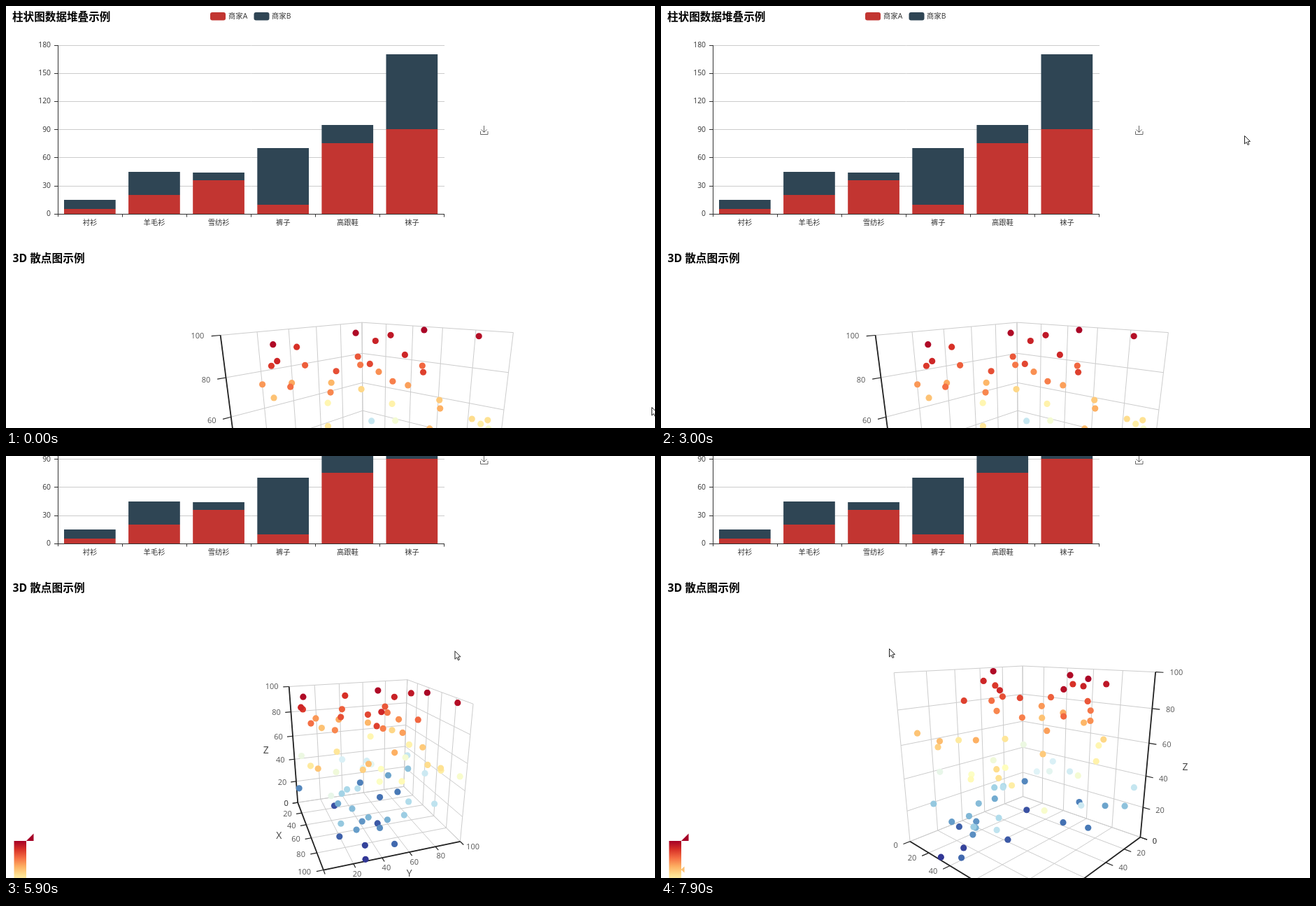
Recreate the animation shown at these times as an HTML page with a canvas. Size 928 px wide and 603 px high, loop 8000 ms.

```html
<!DOCTYPE html>
<html lang="zh">
<head>
<meta charset="utf-8">
<title>图表示例</title>
<style>
html, body { margin: 0; width: 100%; height: 100%; overflow: hidden; background: #fff; }
canvas { display: block; }
</style>
</head>
<body>
<canvas id="stage" width="928" height="603"></canvas>
<script>
const ctx = document.getElementById('stage').getContext('2d');
const FONT = '"Open Sans", "Noto Sans CJK SC", "Noto Sans CJK", sans-serif';
const LOOP = 8000, RED = '#c23531', BLUE = '#2f4554';
const mix = (a, b, k) => a + (b - a) * k;
const clamp = (v, lo, hi) => Math.min(hi, Math.max(lo, v));
const span = (t, start, end) => clamp((t - start) / (end - start), 0, 1);
const easeOut = k => 1 - (1 - k) ** 3;

function path(points) {
  ctx.beginPath();
  points.forEach(p => ctx.lineTo(p[0], p[1]));
}
function line(points, color, width = 1) {
  path(points);
  ctx.strokeStyle = color;
  ctx.lineWidth = width;
  ctx.stroke();
}
function shape(points, color) {
  path(points);
  ctx.fillStyle = color;
  ctx.fill();
}
function box(x, y, w, h, color, r = 0) {
  ctx.beginPath();
  ctx.roundRect(x, y, w, h, r);
  ctx.fillStyle = color;
  ctx.fill();
}
function dot(x, y, r, color) {
  ctx.beginPath();
  ctx.arc(x, y, r, 0, 7);
  ctx.fillStyle = color;
  ctx.fill();
}
function text(s, x, y, size, color, align = 'left', weight = 400, baseline = 'middle') {
  ctx.font = `${weight} ${size}px ${FONT}`;
  ctx.textAlign = align;
  ctx.textBaseline = baseline;
  ctx.fillStyle = color;
  ctx.fillText(s, x, y);
}

// ---- Stacked bars ----
const goods = [['衬衫', 5, 10], ['羊毛衫', 20, 25], ['雪纺衫', 36, 8],
  ['裤子', 10, 60], ['高跟鞋', 75, 20], ['袜子', 90, 80]];
const HIDE = 1430, SHOW = 2250, STEP = 92.1;
const barY = (v, max) => 297.4 - 241.2 * v / max;

function drawBars(t) {
  const hidden = t >= HIDE && t < SHOW;
  const max = hidden ? 80 : 180, oldMax = hidden ? 180 : 80;
  const start = hidden ? HIDE : SHOW;
  const k = t < HIDE ? 1 : easeOut(span(t, start, start + 300));
  const solo = hidden ? k : 1 - k;
  const grow = t < SHOW ? 1 : easeOut(span(t, SHOW, SHOW + 700));

  text('柱状图数据堆叠示例', 9, 17, 15.6, '#000', 'left', 700);
  box(292, 9, 22, 11.5, hidden ? '#ccc' : RED, 3);
  text('商家A', 318, 15, 10.35, hidden ? '#ccc' : '#333');
  box(354.5, 9, 22, 11.5, BLUE, 3);
  text('商家B', 380, 15, 10.35, '#333');

  for (let v = 0; v <= max; v += hidden ? 20 : 30) {
    let y = barY(v, max);
    if (v === 60) y = mix(barY(v, oldMax), y, k);
    const row = Math.floor(y) + .5;
    if (v) line([[74, row], [627, row]], '#ccc');
    line([[69, row], [74, row]], '#333');
    text(v, 64, y, 10.35, '#333', 'right');
  }
  goods.forEach(([name, a, b], i) => {
    const x = 83 + i * STEP, width = 73.7;
    const bottom = Math.floor(mix(barY(a, 180), barY(0, 80), solo));
    const top = Math.floor(mix(barY(a + b, 180), barY(b, 80), solo));
    const aTop = Math.floor(barY(a * grow, 180));
    box(x, top, width, bottom - top, BLUE);
    box(x, aTop, hidden ? width * (1 - k) : width, 297 - aTop, t >= 1000 && t < SHOW ? '#d53a35' : RED);
    text(name, 120 + i * STEP, 310, 10.35, '#333', 'center');
  });
  line([[74.5, 56], [74.5, 301]], '#333');
  line([[74, 297.5], [627, 297.5]], '#333');
  for (let i = 1; i < 7; i++) {
    const x = Math.floor(74 + i * STEP) + .5;
    line([[x, 297], [x, 301.5]], '#333');
  }
  line([[678.5, 179], [678.5, 183.5], [689, 183.5], [689, 179]], '#666');
  line([[683.5, 171], [683.5, 180.5]], '#666');
  line([[679.5, 176.5], [683.5, 180.5], [687.5, 176.5]], '#666');
}

// ---- 3D scatter ----
const palette = ['#313695', '#4575b4', '#74add1', '#abd9e9', '#e0f3f8', '#ffffbf',
  '#fee090', '#fdae61', '#f46d43', '#d73027', '#a50026'];
function valueColor(v) {
  const i = clamp(Math.floor(v / 10), 0, 9), k = v / 10 - i;
  const part = (c, j) => parseInt(c.slice(j, j + 2), 16);
  return `rgb(${[1, 3, 5].map(j => Math.round(mix(part(palette[i], j), part(palette[i + 1], j), k)))})`;
}

let seed = 11;
const random = () => (seed = seed * 16807 % 2147483647) / 2147483647;
// The extremes and the inspected sample are fixed, the rest is scattered evenly by height
const samples = [[53, 92, 99], [28, 63, 98], [33, 5, 98], [82, 100, 97], [32, 89, 95],
  [32, 75, 93], [70, 50, 92], [39, 2, 92], [5, 23, 66], [85, 33, 2], [98, 29, 0]];
const SCATTERED = 68;
for (let i = 0; i < SCATTERED; i++) {
  samples.push([100 * random(), 100 * random(), mix(90, 3, i / SCATTERED)]);
}
const points = samples.map(s => ({ at: s.map(v => v - 50), color: valueColor(s[2]) }));

const CX = 522.5, CY = 608, FOCAL = 555, RAD = Math.PI / 180;
let view;
function setView(t) {
  const turn = span(t, 5500, 6400), back = span(t, 6600, 7100);
  const beta = (40 + 69 * turn + 23.8 * back) * RAD, alpha = (20 + 2 * turn - 5.5 * back) * RAD;
  const distance = 204 + 63 * easeOut(span(t, 3300, 4000)) + 22.5 * span(t, 4600, 4800)
    - 65.5 * span(t, 7200, 7900);
  view = { distance, side: beta < Math.PI / 2 ? -50 : 50, cb: Math.cos(beta), sb: Math.sin(beta),
    ca: Math.cos(alpha), sa: Math.sin(alpha) };
}
function project([x, y, z]) {
  const { distance, cb, sb, ca, sa } = view;
  const near = x * sb - y * cb, depth = distance - near * ca - z * sa;
  const scale = FOCAL / depth;
  return [CX + (x * cb + y * sb) * scale, CY - (z * ca - near * sa) * scale, depth];
}

const edge = (a, b, color, width) => line([project(a), project(b)], color, width);
const along = (p, dir, n) => p.map((v, i) => v + dir[i] * n);
function label(s, at, dir, size, color) {
  const a = project(at), b = project(along(at, dir, 8));
  const dx = b[0] - a[0], dy = b[1] - a[1];
  if (Math.abs(dy) > Math.abs(dx)) text(s, b[0], b[1], size, color, 'center', 400, 'top');
  else text(s, b[0], b[1], size, color, dx < 0 ? 'right' : 'left');
}
function axis(name, place, dir) {
  edge(place(-50), place(50), '#222', 1.8);
  for (let v = 0; v <= 100; v += 20) {
    const p = place(v - 50);
    edge(p, along(p, dir, 4.5), '#222', 1.2);
    label(v, p, dir, 11, '#555');
  }
  const [x, y] = project(along(place(0), dir, 22));
  text(name, x, y, 14, '#444', 'center');
}

// Lines over the back walls and floor that meet at x, y or z
function wallLines(x, y, z, wall, color) {
  edge([-50, -50, z], [-50, 50, z], color);
  edge([-50, wall, z], [50, wall, z], color);
  edge([x, wall, -50], [x, wall, 50], color);
  edge([x, -50, -50], [x, 50, -50], color);
  edge([-50, y, -50], [-50, y, 50], color);
  edge([-50, y, -50], [50, y, -50], color);
}

function drawScatter(t) {
  setView(t);
  const { side } = view, out = [0, Math.sign(side), 0], right = [1, 0, 0];
  const onX = v => [v, side, -50], onY = v => [50, v, -50], onZ = v => [-50, side, v];
  text('3D 散点图示例', 9.5, 361.5, 15.7, '#000', 'left', 700);

  for (let v = -50; v <= 50; v += 20) wallLines(v, v, v, -side, '#ccc');
  axis('X', onX, out);
  axis('Y', onY, right);
  axis('Z', onZ, out);

  if (t >= 6600 && t < 6900) {
    const x = 61.03, y = 0, z = 96.79;
    wallLines(x - 50, y - 50, z - 50, -side, '#333');
    label(x.toFixed(2), onX(x - 50), out, 13.5, '#444');
    label(y.toFixed(2), onY(y - 50), right, 13.5, '#444');
    label(z.toFixed(2), onZ(z - 50), out, 13.5, '#444');
  }

  points.map(p => ({ spot: project(p.at), color: p.color }))
    .sort((a, b) => b.spot[2] - a.spot[2])
    .forEach(({ spot, color }) => dot(spot[0], spot[1], 4.6, color));

  const scale = ctx.createLinearGradient(0, 843, 0, 722);
  palette.forEach((c, i) => scale.addColorStop(i / 10, c));
  box(11.5, 722, 17.5, 121, scale);
  shape([[29, 722], [39.5, 722], [39.5, 711.5]], palette[10]);
  if (t >= 6500) shape([[28.5, 763], [33.5, 758.5], [33.5, 767.5]], valueColor(66));
}

function drawTooltip() {
  box(525.5, 398.5, 45, 79.5, 'rgba(50,50,50,.7)', 3.5);
  dot(534, 412, 4.2, valueColor(66));
  ['- x: 5', '- y: 23', '- z: 66'].forEach((s, i) => text(s, 530, 429.5 + i * 18, 12.8, '#fff'));
}

// ---- Pointer and page ----
// Each move: start, end, destination
const moves = [[0, 900, 333, 5], [2300, 2800, 834, 185], [4300, 4500, 802, 236],
  [4900, 5300, 784, 259], [5500, 6600, 392, 312], [6600, 7100, 288, 252], [7200, 7900, 326, 275]];
const arrow = [[0, 0], [0, 11.5], [2.7, 9], [4.6, 13], [6.4, 12.2], [4.6, 8.3], [8, 8], [0, 0]];

function drawPointer(t) {
  if (t >= 1000 && t < 2300) return;
  let x = 923, y = 573;
  for (const [start, end, toX, toY] of moves) {
    const k = span(t, start, end);
    x = mix(x, toX, k);
    y = mix(y, toY, k);
  }
  const outline = arrow.map(p => [x + .5 + p[0], y + .5 + p[1]]);
  shape(outline, '#fff');
  line(outline, '#222');
}

function draw(now) {
  const t = Math.floor(now % LOOP / 100) * 100;
  box(0, 0, 928, 603, '#fff');
  ctx.save();
  ctx.translate(0, -Math.round(172 * span(t, 3000, 3300)));
  drawBars(t);
  drawScatter(t);
  ctx.restore();
  if (t >= 6500 && t < 6800) drawTooltip();
  drawPointer(t);
  requestAnimationFrame(draw);
}
requestAnimationFrame(draw);
</script>
</body>
</html>
```
